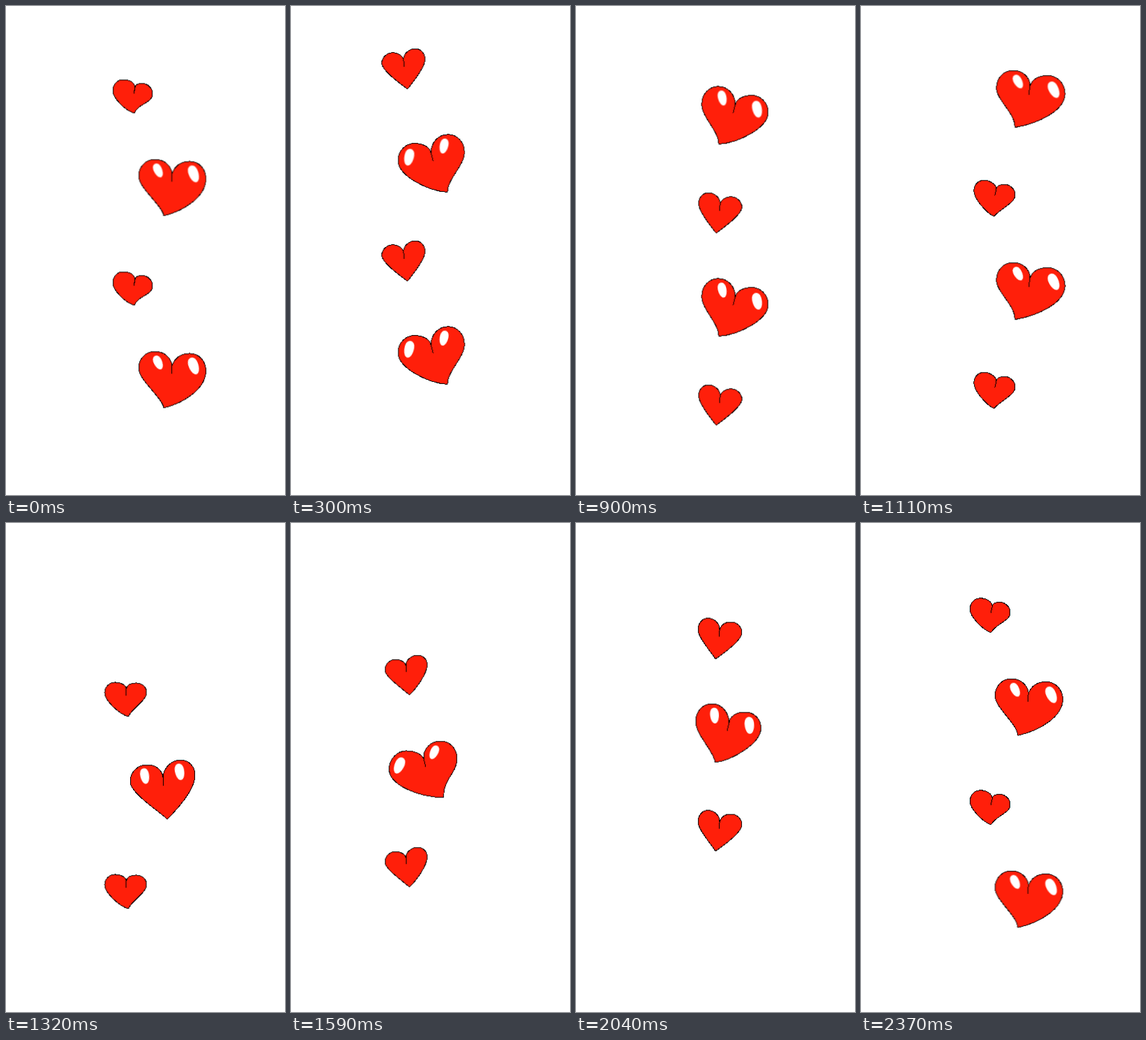
Write an HTML page without scripts that moves like this. It is 400 px wide and 700 px high and loops after 2.4 s.

```html
<!DOCTYPE html>
<html lang="en">
<head>
<meta charset="utf-8">
<title>Rising hearts</title>
<style>
html, body { margin: 0; width: 100%; height: 100%; overflow: hidden; background: #fff; }
svg { display: block; width: 400px; height: 700px; }

.rise { animation: rise 2.4s linear infinite; }
.sway { animation: 600ms cubic-bezier(.364, 0, .636, 1) infinite alternate; }
.big .sway { animation-name: sway-big; animation-delay: -95ms; }
.small .sway { animation-name: sway-small; animation-delay: -290ms; }
.flip { animation: flip 1.2s steps(1) infinite; }

.heart { fill: #ff1f0a; stroke: #000; stroke-linejoin: round; shape-rendering: crispEdges; animation: 600ms linear infinite; }
.big .heart { animation-name: bend-big; }
.small .heart { animation-name: bend-small; }

.shine { fill: #fff; d: path("M0-12.5C5-12.5 7-7 7-2C7 6 4 12.5 0 12.5C-4 12.5-7 6-7-2C-7-7-5-12.5 0-12.5Z"); animation: 600ms linear infinite; }
.left { animation-name: shine-left; }
.right { animation-name: shine-right; }

.leave, .enter { animation: 2.4s steps(1) infinite; }
.big .leave { animation-name: leave-big; }
.big .enter { animation-name: enter-big; }
.small .leave { animation-name: leave-small; }
.small .enter { animation-name: enter-small; }

@keyframes rise { to { transform: translateY(-275px); } }
@keyframes sway-big { from { transform: translateX(27px); } to { transform: translateX(-27px); } }
@keyframes sway-small { from { transform: translateX(24.5px); } to { transform: translateX(-24.5px); } }

/* The second half of each swing mirrors the first. */
@keyframes flip { 0% { transform: scaleX(1); } 50%, 100% { transform: scaleX(-1); } }

@keyframes leave-big { 0% { opacity: 1; } 51.2%, 100% { opacity: 0; } }
@keyframes enter-big { 0% { opacity: 0; } 87.4%, 100% { opacity: 1; } }
@keyframes leave-small { 0% { opacity: 1; } 13.7%, 100% { opacity: 0; } }
@keyframes enter-small { 0% { opacity: 0; } 37.4%, 100% { opacity: 1; } }

/* Order: crease, left lobe, tip, right lobe, back to the crease. */
@keyframes bend-big {
  0% { d: path("M-1-9L0-21C-2-33-12-41-25-41S-48-30-48-17C-48 0-15 24-12 40C20 32 48.5 11 48.5-13C48.5-27 39-38 25-38S4-31 0-21"); }
  20% { d: path("M0-8L-1-20C-2-31-11-38-24-38S-48-28-48-14C-48 3-4 30 5 40C13 32 45 0 45-23C45-36 36-45 24-45S0-35-1-20"); }
  40% { d: path("M3-4L0-16C-1-25-10-31-23-31S-45.5-21-45.5-8C-45.5 14-4 38 20 41C22 25 48 1 48-17C48-32 38-43 25-43S1-33 0-16"); }
  65% { d: path("M1-4L-2-16C-5-22-14-27-27-27S-51.5-15-51.5-1C-51.5 23-8 39 27 40C25 14 46 5 46-16C46-30 36-41 22-41S-3-30-2-16"); }
  80% { d: path("M1-5L-1-18C-4-27-13-32-27-32S-52-20-52-6C-52 19-10 36 24 41C22 18 47 3 47-16C47-30 37-41 23-41S-2-31-1-18"); }
  100% { d: path("M1-9L0-21C-4-31-11-38-25-38S-48.5-27-48.5-13C-48.5 11-20 32 12 40C15 24 48 0 48-17C48-30 38-41 25-41S2-33 0-21"); }
}
@keyframes bend-small {
  0% { d: path("M-2-4L0-13C-1-20-8-24-17-24S-32-17-32-8C-32 2-15 20-1 24C2 12 25 9 25-3C25-12 18-18.5 10-18.5S0-16 0-13"); }
  20% { d: path("M2-6L2-16C1-21-5-25-14-25S-29-18-29-10C-29 1-8 21 5 24C9 13 31 1 31-10C31-18 25-24 16-24S3-21 2-16"); }
  40% { d: path("M2-8L1-17C0-24-6-29-15-29S-31-22-31-14C-31-3-5 16 7 24C14 13 32-7 32-18C32-27 26-34.5 18-34.5S0-28 1-17"); }
  65% { d: path("M4-9L3-18C2-23-4-27-12-27S-27-20-27-12C-27-2-3 14 8 24C18 15 33.5-7 33.5-19C33.5-27 28-33 20-33S3-27 3-18"); }
  80% { d: path("M5-6L3-16C2-20-3-23-10-23S-25-16-25-8C-25 3-5 13 7 24C18 18 35-3 35-14C35-23 29-29 21-29S2-23 3-16"); }
  100% { d: path("M2-4L0-13C0-16-2-18.5-10-18.5S-25-12-25-3C-25 9-2 12 1 24C15 20 32 2 32-8C32-17 26-24 17-24S1-20 0-13"); }
}

@keyframes shine-left {
  0% { transform: translate(-20px, -25px) rotate(-25deg) scale(.85); }
  20% { transform: translate(-27px, -22px) rotate(-10deg) scale(.9); }
  40% { transform: translate(-29px, -12px) rotate(4deg) scale(.97); }
  65% { transform: translate(-37px, -6px) rotate(24deg) scale(.98); }
  80% { transform: translate(-36px, -11px) rotate(26deg) scale(1); }
  100% { transform: translate(-32px, -20px) rotate(24deg) scale(1); }
}
@keyframes shine-right {
  0% { transform: translate(31px, -20px) rotate(-20deg) scale(1); }
  20% { transform: translate(23px, -28px) rotate(-10deg) scale(.95); }
  40% { transform: translate(21px, -26px) rotate(4deg) scale(.9); }
  65% { transform: translate(13px, -25px) rotate(25deg) scale(.83); }
  80% { transform: translate(15px, -25px) rotate(30deg) scale(.85); }
  100% { transform: translate(20px, -25px) rotate(25deg) scale(.85); }
}
</style>
</head>
<body>
<svg viewBox="0 0 400 700">
  <g class="rise">
    <g class="small">
      <g class="leave" transform="translate(184 129.5)"><g class="sway"><g class="flip"><path class="heart"/></g></g></g>
      <g transform="translate(184 404.5)"><g class="sway"><g class="flip"><path class="heart"/></g></g></g>
      <g class="enter" transform="translate(184 679.5)"><g class="sway"><g class="flip"><path class="heart"/></g></g></g>
    </g>
    <g class="big">
      <g class="leave" transform="translate(214.5 260.5)"><g class="sway"><g class="flip"><path class="heart"/><path class="shine left"/><path class="shine right"/></g></g></g>
      <g transform="translate(214.5 535.5)"><g class="sway"><g class="flip"><path class="heart"/><path class="shine left"/><path class="shine right"/></g></g></g>
      <g class="enter" transform="translate(214.5 810.5)"><g class="sway"><g class="flip"><path class="heart"/><path class="shine left"/><path class="shine right"/></g></g></g>
    </g>
  </g>
</svg>
</body>
</html>
```
